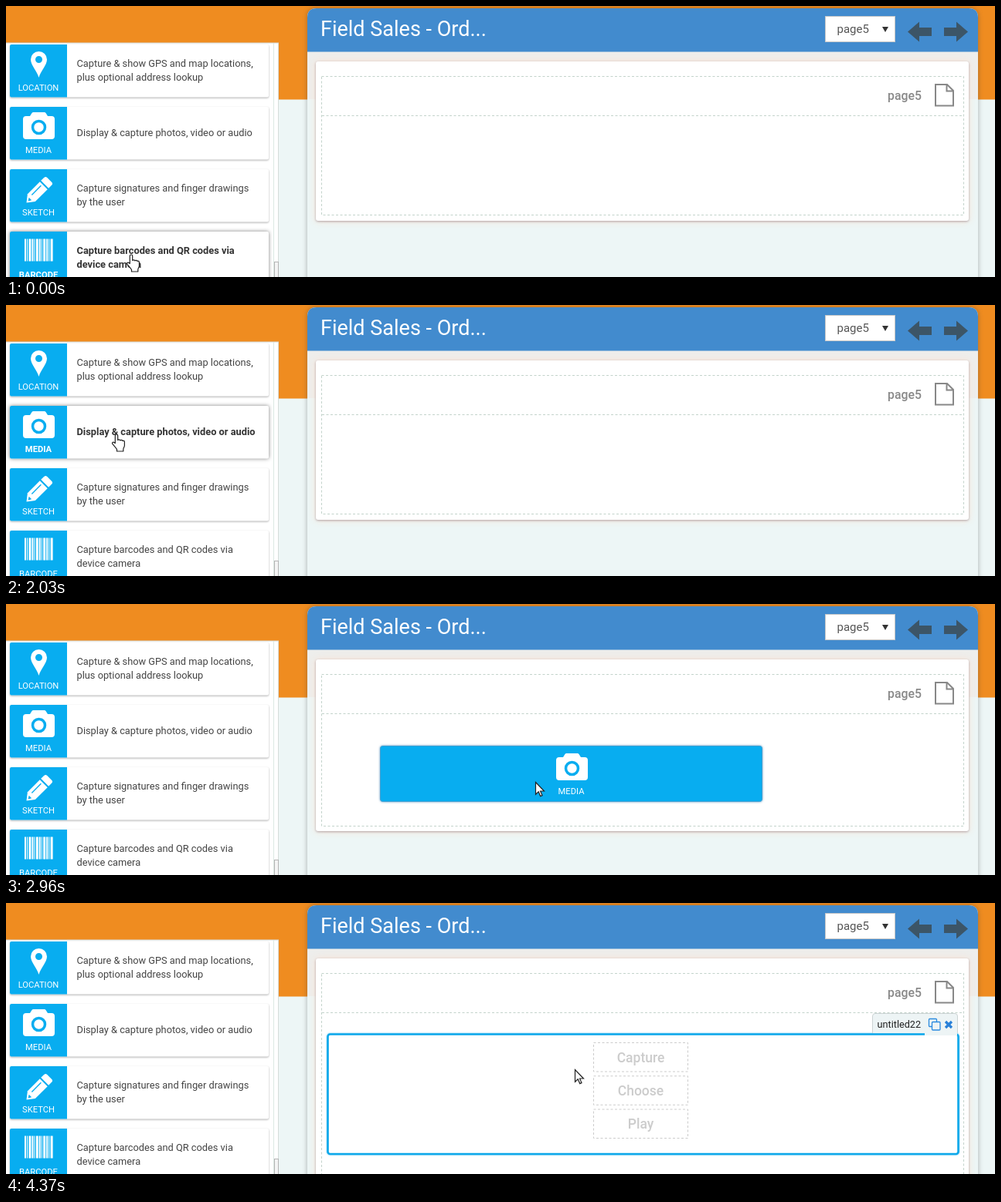
An HTML page for the animation above (6400 ms loop, 1280 px wide and 352 px high).

```html
<!DOCTYPE html>
<html lang="en">
<head>
<meta charset="utf-8">
<title>Form designer</title>
<style>
  html, body { margin: 0; width: 100%; height: 100%; overflow: hidden; background: #edf6f6; }
  svg { display: block; width: 100%; height: 100%; }
  text { font-family: Roboto, Arial, sans-serif; }
  .card .face { fill: #fff; filter: drop-shadow(0 1px 1px rgba(0, 0, 0, .32)); }
  .card .desc { font-size: 12.8px; fill: #444; }
  .label { font-size: 11.2px; fill: #fff; text-anchor: middle; }
  .hover .face { filter: drop-shadow(0 0 2.5px rgba(0, 0, 0, .5)); }
  .hover text { font-weight: 700; }
  .hover .desc { fill: #333; }
  .dash { fill: none; stroke: #c3d3cb; stroke-dasharray: 3 2.5; }
  .slot { fill: #fff; stroke: #ccc; stroke-dasharray: 3 2.5; }
  .slot-text { font-size: 17.5px; font-weight: 500; fill: #ccc; text-anchor: middle; }
  #page { fill: #fff; filter: drop-shadow(0 1px 1.5px rgba(110, 85, 95, .5)) drop-shadow(0 0 5px rgba(255, 222, 203, .7)); }
  #app { filter: drop-shadow(0 0 3px rgba(60, 60, 60, .4)); }
  #ghost .plate { fill: #08adf0; stroke: #3f9fd2; filter: drop-shadow(0 0 1.5px rgba(30, 110, 170, .7)); }
  #frame { fill: #fff; stroke: #0ba7ea; stroke-width: 2.6; filter: drop-shadow(0 0 1px rgba(11, 167, 234, .6)); }
</style>
</head>
<body>
<svg viewBox="0 0 1280 352" preserveAspectRatio="none">
  <defs>
    <g id="pin">
      <path fill="#fff" fill-rule="evenodd" d="M0 34C-2 26-10.500 18-10.500 10.500a10.500 10.500 0 0 1 21 0C10.500 18 2 26 0 34zM0 15a4.500 4.500 0 1 0 0-9a4.500 4.500 0 1 0 0 9z"/>
    </g>
    <g id="camera">
      <path fill="#fff" d="M-16.500 5H-11.500L-9 1Q-8.300 0-7 0H7Q8.300 0 9 1L11.500 5H16.500Q20.500 5 20.500 9V31Q20.500 35 16.500 35H-16.500Q-20.500 35-20.500 31V9Q-20.500 5-16.500 5z"/>
      <circle cy="19.500" r="8" fill="none" stroke="#08adf0" stroke-width="3.500"/>
    </g>
    <g id="pencil" fill="#fff">
      <g transform="translate(-16 34.500) rotate(-45)">
        <path d="M0 0L9-7H31.500V7H9z"/>
        <path d="M33.500-7H39Q42-7 42-4V4Q42 7 39 7H33.500z"/>
        <path d="M12-2.300H29" stroke="#08adf0" stroke-width="1.400"/>
        <path d="M3 0L7-2.500V2.500z" fill="#08adf0"/>
      </g>
    </g>
    <g id="stripes">
      <path d="M-18.500 15H18.500" stroke="#fff" stroke-width="29" stroke-dasharray="2 1 1 1.400 3 1"/>
    </g>
  </defs>

  <rect width="1280" height="352" fill="#edf6f6"/>
  <rect width="1280" height="121.500" fill="#ef8c20"/>

  <g id="app">
    <path fill="#edf6f6" d="M390 370V15Q390 3 402 3H1246Q1258 3 1258 15V370z"/>
    <path fill="#eeeeec" d="M390 59H1258V121H390z"/>
    <path fill="#428bce" d="M390 59.500V15Q390 3 402 3H1246Q1258 3 1258 15V59.500z"/>
  </g>
  <text x="407" y="39" font-size="27" fill="#fff">Field Sales - Ord...</text>
  <rect x="1060.500" y="13.500" width="90" height="33" fill="#fff" stroke="#c8c8c8"/>
  <text x="1075.500" y="35" font-size="15" fill="#555">page5</text>
  <path d="M1134 27H1142L1138 34z" fill="#333"/>
  <g fill="#3c5567">
    <path id="arrow" d="M1167 33.500L1182 20.500V28H1198V39H1182V46.500z"/>
    <use href="#arrow" transform="matrix(-1 0 0 1 2412 0)"/>
  </g>

  <rect id="page" x="401" y="72" width="845" height="207" rx="3"/>
  <rect id="zone" class="dash" x="408.500" y="91.500" width="831" height="180"/>
  <path class="dash" d="M409 142.500H1240"/>
  <text x="1141" y="122" font-size="15.800" font-weight="500" fill="#888">page5</text>
  <path fill="none" stroke="#888" stroke-width="2" d="M1203 102H1218L1226 110V129.500H1203zM1217.500 102V110.500H1226"/>

  <g id="field">
    <rect id="frame" x="416.500" y="170.500" width="816" height="155.500" rx="3"/>
    <path d="M1121.500 169V147Q1121.500 143.500 1125 143.500H1228Q1231.500 143.500 1231.500 147V169" fill="#edf4f5" stroke="#ccd3d4"/>
    <rect x="1189" y="168" width="42" height="4" fill="#edf4f5"/>
    <text x="1127.500" y="162" font-size="12.700" fill="#222">untitled22</text>
    <g fill="#edf4f5" stroke="#2b8be0" stroke-width="1.300">
      <rect x="1194.500" y="150.500" width="10" height="10" rx="1"/>
      <rect x="1198.500" y="154.500" width="10.500" height="10.500" rx="1"/>
    </g>
    <path d="M1216 154L1224 162M1224 154L1216 162" stroke="#2980d8" stroke-width="3.200"/>
    <g id="slots"></g>
  </g>

  <rect x="-5" y="48" width="357.500" height="320" fill="#fff" stroke="#d4dcda"/>
  <path d="M346.500 48V352" stroke="#dbe8e3"/>
  <rect x="347.500" y="332.500" width="5" height="30" fill="#f4f4f4" stroke="#b5b5b5"/>
  <g id="cards"></g>

  <g id="ghost">
    <rect class="plate" x=".5" y=".5" width="494" height="72" rx="3"/>
    <use href="#camera" x="248.500" y="10"/>
    <text class="label" x="247.500" y="63">MEDIA</text>
  </g>
  <path id="hand" fill="#fff" stroke="#222" stroke-width="1.200" stroke-linejoin="round" d="M-1.700 11.500V1.700a1.700 1.700 0 0 1 3.400 0V7.500c.3-1 3-1 3.200.3c.6-.8 2.700-.6 2.900.6c.9-.5 2.600 0 2.600 1.500V14.500c0 2-1.600 3-1.600 5V22H.5V19.500C-.5 17.500-3.700 14.300-5.200 12.300c-1-1.300.8-2.800 2-1.900z"/>
  <path id="pointer" fill="#fff" stroke="#222" stroke-width="1.200" d="M.5.500V16.300L4.200 12.800L6.700 18.600L9 17.600L6.600 12H11.500z"/>
</svg>

<script>
const LOOP = 6400, STEP = 30, GRAB = 2390, ENTER = 2900, DROP = 4100;
const $ = id => document.getElementById(id);

const cards = [
  { y: 50, name: 'LOCATION', icon: 'pin', dy: 9, lines: ['Capture & show GPS and map locations,', 'plus optional address lookup'] },
  { y: 131, name: 'MEDIA', icon: 'camera', dy: 7, lines: ['Display & capture photos, video or audio'] },
  { y: 212, name: 'SKETCH', icon: 'pencil', dy: 9, lines: ['Capture signatures and finger drawings', 'by the user'] },
  { y: 293, name: 'BARCODE', icon: 'stripes', dy: 9, lines: ['Capture barcodes and QR codes via', 'device camera'] }
];

const cardMarkup = ({ y, name, icon, dy, lines }) => {
  const first = lines.length > 1 ? 29 : 38;
  const desc = lines.map((line, i) =>
    `<text class="desc" x="91.500" y="${first + 17.5 * i}">${line.replace('&', '&amp;')}</text>`).join('');
  return `<g class="card" transform="translate(0 ${y})">
    <rect class="face" x="5" width="335" height="68.500" rx="2"/>
    <path fill="#08adf0" d="M79 0V68.500H7Q5 68.500 5 66.500V2Q5 0 7 0z"/>
    <use href="#${icon}" x="42.500" y="${dy}"/>
    <text class="label" x="42" y="60">${name}</text>${desc}</g>`;
};
$('cards').innerHTML = cards.map(cardMarkup).join('');
const cardNodes = [...$('cards').children];

$('slots').innerHTML = ['Capture', 'Choose', 'Play'].map((word, i) =>
  `<rect class="slot" x="760.500" y="${181.5 + 43.25 * i}" width="122" height="37.500"/>
   <text class="slot-text" x="821.500" y="${207 + 43 * i}">${word}</text>`).join('');

// Paths are [time, x, y]
const cursorPath = [
  [30, 162, 323], [300, 146, 170], [760, 146, 170], [1160, 152, 226], [1370, 154, 248],
  [1430, 154, 248], [2030, 143, 168], [GRAB, 144, 168], [2510, 152, 164], [2600, 192, 175],
  [2660, 239, 186], [2740, 387, 201], [2840, 570, 222], [2930, 672, 232], [3020, 712, 228], [3140, 736, 216]
];
const ghostPath = [
  [GRAB, 5, 131], [2570, 14, 127], [2660, 52, 137], [2740, 120, 146], [2840, 248, 163],
  [2930, 440, 182], [3020, 573, 188], [3110, 590, 181], [3200, 597, 178]
];

function along(path, t) {
  const i = path.findIndex(p => p[0] > t);
  if (i === 0) return path[0].slice(1);
  if (i < 0) return path[path.length - 1].slice(1);
  const [t0, x0, y0] = path[i - 1], [t1, x1, y1] = path[i];
  const k = (t - t0) / (t1 - t0);
  return [x0 + (x1 - x0) * k, y0 + (y1 - y0) * k];
}

const place = (node, [x, y]) => node.setAttribute('transform', `translate(${Math.round(x)} ${Math.round(y)})`);
const show = (node, on) => node.setAttribute('visibility', on ? 'visible' : 'hidden');

function draw(t) {
  const pos = along(cursorPath, t);
  const browsing = t < GRAB;
  place($('hand'), pos);
  place($('pointer'), pos);
  show($('hand'), browsing);
  show($('pointer'), !browsing);

  cardNodes.forEach((node, i) => {
    const dy = pos[1] - cards[i].y;
    node.classList.toggle('hover', browsing && dy >= 0 && dy < 69);
  });

  place($('ghost'), along(ghostPath, t));
  show($('ghost'), !browsing && t < DROP);

  const bottom = t < ENTER ? 279 : t < DROP ? 295 : 380;
  $('page').setAttribute('height', bottom - 72);
  $('zone').setAttribute('height', bottom - (t < ENTER ? 99 : 98));

  show($('field'), t >= DROP);
  $('field').setAttribute('opacity', Math.min(1, Math.max(0, (t - DROP + STEP) / 240)));
}

// The screen advances in steps, aligned with the moment of the grab
const snap = t => GRAB + Math.floor((t - GRAB) / STEP) * STEP;

const start = performance.now();
function tick() {
  draw(snap((performance.now() - start) % LOOP));
  requestAnimationFrame(tick);
}
tick();
</script>
</body>
</html>
```
